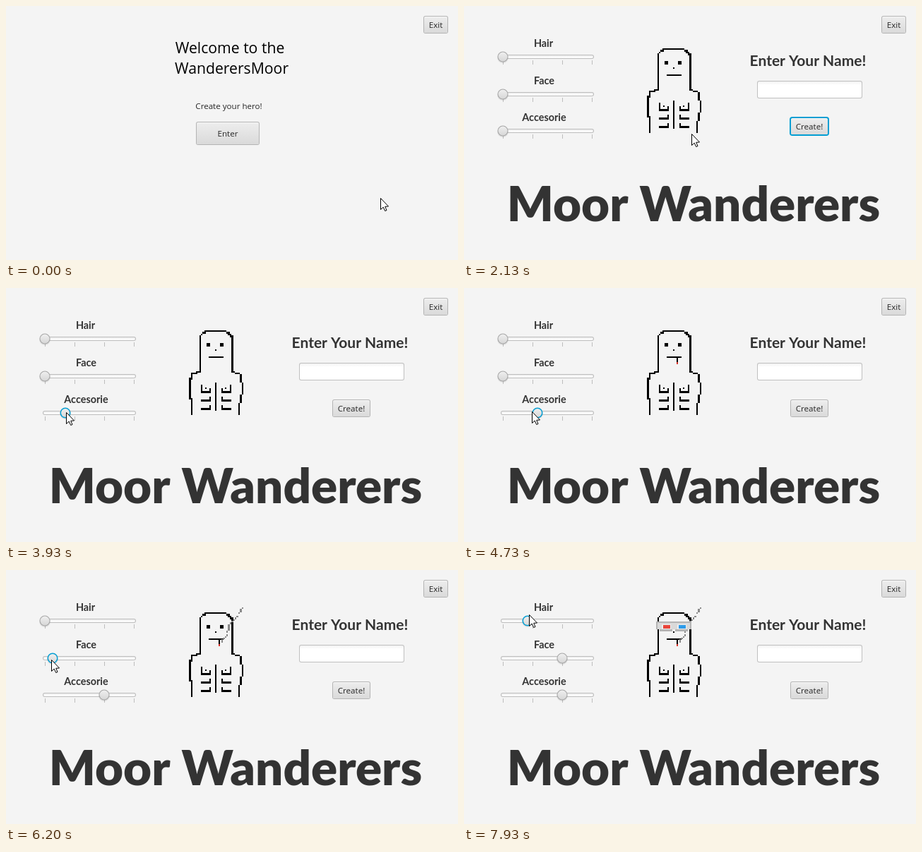
An HTML page with a canvas that plays this animation: 640x360 px, repeating every 8000 ms.

```html
<!DOCTYPE html>
<html lang="en">
<head>
<meta charset="utf-8">
<title>Hero creator</title>
<style>
html, body { margin: 0; width: 100%; height: 100%; overflow: hidden; background: #f4f4f4; }
canvas { display: block; width: 640px; height: 360px; }
</style>
</head>
<body>
<canvas id="stage" width="640" height="360"></canvas>
<script>
const ctx = document.getElementById('stage').getContext('2d');
const LOOP = 8000;
const TICK = 1000 / 15;
const BLUE = '#039ed3';
const UI = '"Open Sans", "Noto Sans", sans-serif';
const ROUND = 'Lato, "Open Sans", sans-serif';
const FIRST = 55, STEP = 42; // slider stops
const CELL = 2.4;            // size of one hero pixel

const moves = [
  { from: 8, to: 19, x: 299, y: 186 },
  { from: 19, to: 21, x: 322, y: 181 },
  { from: 40, to: 48, x: 56, y: 176 },
  { from: 52, to: 61, x: 89, y: 176 },
  { from: 69, to: 77, x: 134, y: 172 },
  { from: 80, to: 91, x: 53, y: 126 },
  { from: 91, to: 97, x: 95, y: 128 },
  { from: 101, to: 105, x: 133, y: 123 },
  { from: 106, to: 113, x: 57, y: 65 },
  { from: 114, to: 119, x: 92, y: 63 }
];
const drags = [
  { name: 'Accesorie', press: 52, release: 62 },
  { name: 'Accesorie', press: 69, release: 77 },
  { name: 'Face', press: 91, release: 97 },
  { name: 'Face', press: 101, release: 106 },
  { name: 'Hair', press: 114, release: 120 }
];

function pointerAt(tick) {
  let x = 530, y = 272;
  for (const m of moves) {
    const p = Math.min(1, Math.max(0, (tick - m.from) / (m.to - m.from)));
    const eased = p * p * (3 - 2 * p);
    x += (m.x - x) * eased;
    y += (m.y - y) * eased;
  }
  return { x: Math.round(x), y: Math.round(y) };
}

// A held thumb follows the pointer and snaps to the nearest stop on release.
function thumbAt(name, tick) {
  let x = FIRST;
  for (const d of drags) {
    if (d.name !== name || tick <= d.press) continue;
    x += pointerAt(Math.min(tick, d.release)).x - pointerAt(d.press).x;
    if (tick >= d.release) x = FIRST + STEP * Math.round((x - FIRST) / STEP);
  }
  return x;
}

function text(str, x, y, font, color = '#333') {
  ctx.font = font;
  ctx.fillStyle = color;
  ctx.textAlign = 'center';
  ctx.fillText(str, x, y);
}

function box(x, y, w, h, r, fill) {
  ctx.fillStyle = fill;
  ctx.beginPath();
  ctx.roundRect(x, y, w, h, r);
  ctx.fill();
}

function rect(x, y, w, h, fill = '#000') {
  ctx.fillStyle = fill;
  ctx.fillRect(x, y, w, h);
}

function disc(x, y, r, fill) {
  ctx.fillStyle = fill;
  ctx.beginPath();
  ctx.arc(x, y, r, 0, 7);
  ctx.fill();
}

function shade(y0, y1, top, bottom) {
  const g = ctx.createLinearGradient(0, y0, 0, y1);
  g.addColorStop(0, top);
  g.addColorStop(1, bottom);
  return g;
}

function button(label, x, y, w, h, focus, pressed) {
  if (focus) box(x - 1, y - 1, w + 2, h + 2, 4, BLUE);
  else box(x, y, w, h, 3, '#b4b4b4');
  box(x + 1, y + 1, w - 2, h - 2, 2, '#f8f8f8');
  const [top, bottom] = pressed ? ['#cfcfcf', '#dcdcdc'] : ['#eeeeee', '#d9d9d9'];
  box(x + 1, y + 2, w - 2, h - 3, 2, shade(y, y + h, top, bottom));
  text(label, x + w / 2, y + h / 2 + 4.5, `11.6px ${UI}`, '#262626');
}

function slider(name, mid, y, tick, focus) {
  const thumb = thumbAt(name, tick);
  text(name, mid, y - 14, `bold 14.4px ${ROUND}`);
  box(52, y - 3, 132, 6, 3, '#bcbcbc');
  box(53, y - 2, 130, 4, 2, shade(y - 2, y + 2, '#eeeeee', '#ffffff'));
  for (let i = 0; i < 4; i++) rect(FIRST + STEP * i, y + 5, 1, 6, '#bdbdbd');
  disc(thumb, y + 1, 8, 'rgba(0,0,0,.08)');
  disc(thumb, y, 7.5, focus ? BLUE : '#a6a6a6');
  disc(thumb, y, focus ? 6 : 6.5, shade(y - 7, y + 7, '#f0f0f0', '#d6d6d6'));
}

function cell(x, y, color = '#000') {
  const [left, right, top, bottom] = [x, x + CELL, y, y + CELL]
    .map(v => Math.round(Math.floor(v / CELL + 1e-6) * CELL));
  rect(left, top, right - left, bottom - top, color);
}

// Draws lines as blocky steps on the hero's pixel grid.
function pixels(points, flip) {
  for (let i = 1; i < points.length; i++) {
    const [x0, y0] = points[i - 1], [x1, y1] = points[i];
    const n = Math.ceil(Math.max(Math.abs(x1 - x0), Math.abs(y1 - y0)));
    for (let k = 0; k <= n; k++) {
      const x = x0 + (x1 - x0) * k / n;
      cell(flip ? 594 - x : x, y0 + (y1 - y0) * k / n);
    }
  }
}

const halfBody = [
  [297, 60], [286, 60], [274, 68], [274, 119], [263, 122],
  [260, 136], [260, 150], [263, 164], [263, 179]
];

function hero(face, extra) {
  for (const flip of [false, true]) {
    pixels(halfBody, flip);
    pixels([[276, 137], [276, 147], [289, 147], [289, 142]], flip);
    for (const y of [160, 172]) pixels([[277, y], [288, y], [288, y - 5]], flip);
    rect(flip ? 303 : 284, 78, 5, 5);
    rect(flip ? 310 : 282, 141, 2, 2);
  }
  rect(296, 134, 2, 40);
  rect(296, 87, 2, 2);
  rect(287, 97, 21, 2);
  if (extra) cigarette(extra > 1);
  if (face === 1) shades();
  if (face === 2) stereoGlasses();
}

function cigarette(smoking) {
  rect(301, 99, 2, 7);
  rect(301, 105, 2, 3, '#d8322a');
  if (!smoking) return;
  for (let i = 0; i < 22; i++) {
    const p = i / 21;
    if (i % 6 !== 5) cell(305 + 28 * p + 2 * Math.sin(9 * p), 103 - 50 * p, '#8a8a8a');
  }
}

function shades() {
  rect(274, 78, 48, 3);
  for (const x of [277, 301]) {
    for (let i = 0; i < 3; i++) rect(x + 2 * i, 80 + 2 * i, 18 - 4 * i, 3);
    for (let i = 0; i < 6; i++) rect(x + 2 + 2 * i, 80 + i % 3 * 2, 1, 1, '#8c8c8c');
  }
}

function stereoGlasses() {
  rect(272, 73, 50, 11, '#b4b4b4');
  rect(274, 75, 46, 9, '#d9d9d9');
  [[280, '#e8453a'], [302, '#2f9be8']].forEach(([x, color]) => {
    rect(x - 3, 84, 18, 3, '#b4b4b4');
    rect(x, 77, 13, 7, '#eeeeee');
    rect(x + 2, 78, 10, 5, color);
  });
}

function arrow({ x, y }) {
  ctx.save();
  ctx.translate(x + 0.5, y + 0.5);
  ctx.beginPath();
  [[0, 0], [0, 16], [3.7, 12.6], [6.2, 18], [8.5, 17], [6.2, 11.8], [11, 11.5]]
    .forEach(([px, py]) => ctx.lineTo(px, py));
  ctx.closePath();
  ctx.fillStyle = '#fff';
  ctx.fill();
  ctx.strokeStyle = '#000';
  ctx.stroke();
  ctx.restore();
}

function welcome(tick) {
  text('Welcome to the', 317, 67, `21.2px ${UI}`, '#000');
  text('WanderersMoor', 319.5, 96, `21.2px ${UI}`, '#000');
  text('Create your hero!', 315.5, 146, `11.6px ${UI}`, '#262626');
  const down = tick >= 27;
  button('Enter', 269, 164, 90, 33, down, down);
}

function creator(tick) {
  const focus = drags.findLast(d => d.press < tick)?.name;
  const level = name => Math.floor((thumbAt(name, tick) - FIRST) / STEP);

  slider('Hair', 112.5, 72, tick, focus === 'Hair');
  slider('Face', 113.5, 125, tick, focus === 'Face');
  slider('Accesorie', 113.5, 177, tick, focus === 'Accesorie');
  hero(level('Face'), level('Accesorie'));

  text('Enter Your Name!', 487, 85, `bold 21px ${ROUND}`);
  box(415, 106, 149, 25, 3, '#bfbfbf');
  box(416, 107, 147, 23, 2, shade(107, 112, '#f2f2f2', '#ffffff'));
  button('Create!', 462, 158, 54, 25, !focus);
  text('Moor Wanderers', 325, 305, `900 69px ${ROUND}`);
}

function draw(now) {
  // The small lead keeps rounded frame times on the right tick.
  const tick = Math.floor((now % LOOP + 4) / TICK) % 120;
  rect(0, 0, 640, 360, '#f4f4f4');
  button('Exit', 591, 14, 35, 25);
  (tick < 32 ? welcome : creator)(tick);
  arrow(pointerAt(tick));
}

let start;
function loop(now) {
  start ??= now;
  draw(now - start);
  requestAnimationFrame(loop);
}
draw(0);
requestAnimationFrame(loop);
</script>
</body>
</html>
```
